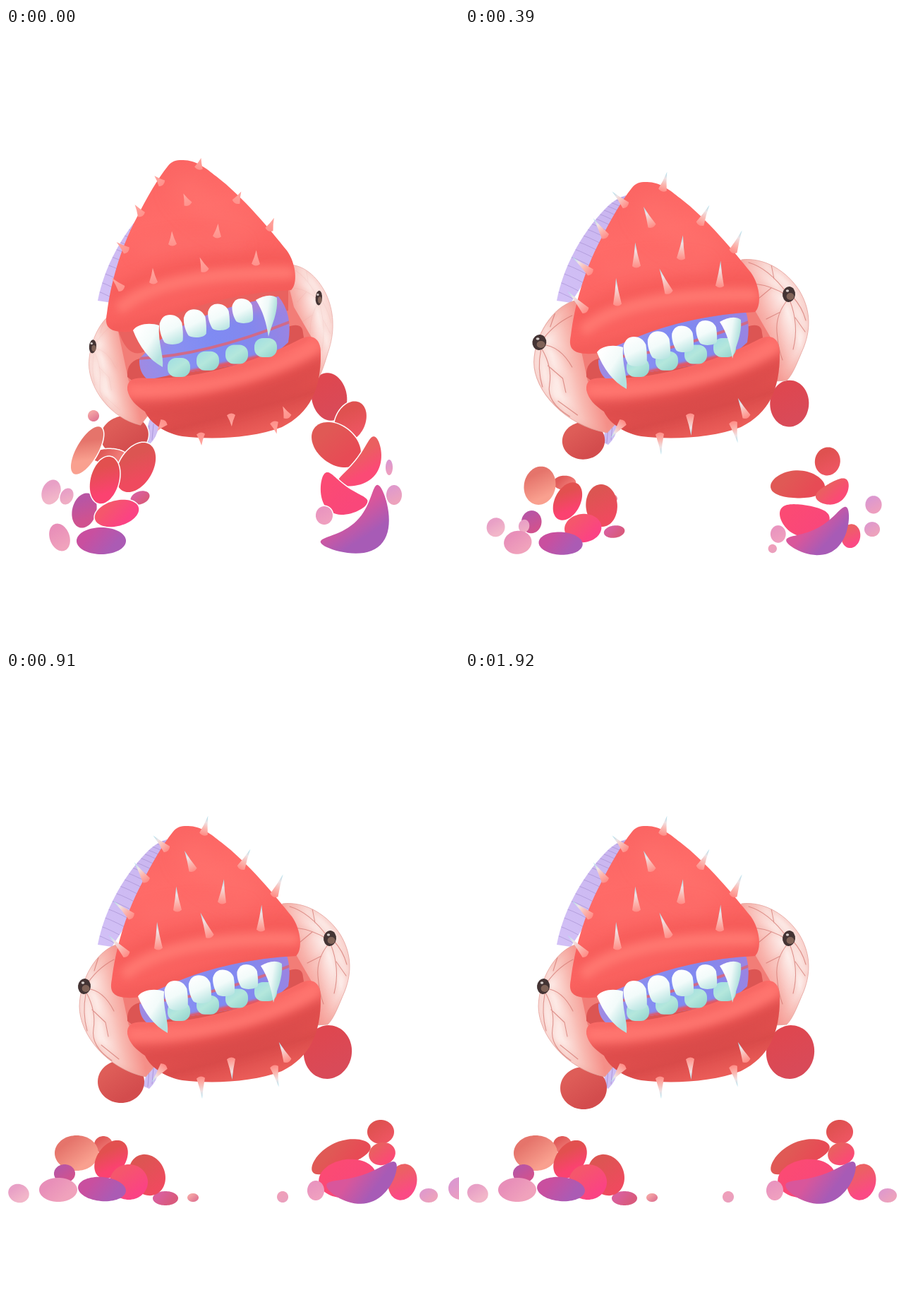
These frames come from a looping animation (642 px wide and 872 px high, 2420 ms). An HTML page with a canvas:

```html
<!DOCTYPE html>
<html lang="en">
<head>
<meta charset="utf-8">
<title>Crumbling creature</title>
<style>
  html, body { margin: 0; width: 100%; height: 100%; overflow: hidden; background: #fff; }
  canvas { display: block; }
</style>
</head>
<body>
<canvas id="stage" width="642" height="872"></canvas>
<script>
const ctx = document.getElementById('stage').getContext('2d');
const LOOP = 2420, SINK = 390, FALL = 650;
const STEPS = [0, 130, 260, 390, 520, 650, 780, 910, 1040, 1170, 1270, 1470, 1670, 1920];
const mix = (a, b, t) => a + (b - a) * t;
const progress = (t, from, length) => Math.min(1, Math.max(0, (t - from) / length));
const easeOut = p => 1 - (1 - p) ** 2;

function ramp(x0, y0, x1, y1, ...colors) {
  const g = ctx.createLinearGradient(x0, y0, x1, y1);
  colors.forEach((c, i) => g.addColorStop(i / (colors.length - 1), c));
  return g;
}

function fill(d, style) {
  ctx.fillStyle = style;
  ctx.fill(new Path2D(d));
}

function line(d, color, width, blur = 0, alpha = 1) {
  ctx.save();
  if (blur) ctx.filter = `blur(${blur}px)`;
  ctx.globalAlpha = alpha;
  ctx.strokeStyle = color;
  ctx.lineWidth = width;
  ctx.lineCap = ctx.lineJoin = 'round';
  ctx.stroke(new Path2D(d));
  ctx.restore();
}

function inside(d, paint) {
  ctx.save();
  ctx.clip(new Path2D(d));
  paint();
  ctx.restore();
}

function blob(x, y, rx, ry, color, angle = 0) {
  ctx.fillStyle = color;
  ctx.beginPath();
  ctx.ellipse(x, y, rx, ry, angle, 0, Math.PI * 2);
  ctx.fill();
}

// ---- stones: each falls from its place in the leg to its place in the pile
const stones = [];
const stone = (c1, c2, from, to, drift) => stones.push({ c1, c2, from, to, drift });
const pose = (x, y, rx, ry, deg = 0, bend = 0) => ({ x, y, rx, ry, deg, bend });

// thighs bounce up when the rubble lands
const bounce = (dx, dy) => t => t >= FALL && t < 1040 ? [dx, dy] : [0, 0];
const roll = (dx, dy, time, back = 0) => t => {
  const p = progress(t, FALL, time);
  return [dx * p + back * progress(t, FALL + time, 300), dy * p];
};

function bean(rx, ry, bend) {
  const path = new Path2D();
  for (let a = 0; a < Math.PI * 2; a += Math.PI / 36) {
    const c = Math.cos(a);
    path.lineTo(rx * c, ry * (Math.sin(a) + bend * (2 * c * c - 1)));
  }
  path.closePath();
  return path;
}

function drawStone({ c1, c2, from, to, drift }, t) {
  const p = progress(t, 0, FALL);
  const now = key => mix(from[key], to[key], p);
  const size = 1 - 0.1 * Math.sin(Math.PI * p);
  const [dx, dy] = drift ? drift(t) : [0, 0];
  const rx = now('rx') * size, ry = now('ry') * size, turn = now('deg') * Math.PI / 180;
  const path = bean(rx, ry, now('bend'));
  // keep the light falling from the upper left whatever the turn
  const gx = 0.6 * rx * Math.cos(0.9 - turn), gy = 0.8 * ry * Math.sin(0.9 - turn);
  ctx.save();
  ctx.translate(now('x') + dx, now('y') + dy);
  ctx.rotate(turn);
  if (p < 0.3) {
    ctx.strokeStyle = '#fff';
    ctx.lineWidth = 3;
    ctx.stroke(path);
  }
  ctx.fillStyle = ramp(-gx, -gy, gx, gy, c1, c2);
  ctx.fill(path);
  ctx.restore();
}

// left leg
stone('#f3a2a4', '#e27a94', pose(124, 549, 8, 8), pose(265, 744, 8, 6));
stone('#d95f9c', '#d95a7e', pose(190, 665, 14, 9, -20), pose(226, 745, 18, 10));
stone('#de5d58', '#d34c4d', pose(168, 577, 34, 28, -10), pose(168, 589, 33, 30), bounce(-5, -9));
stone('#e05a58', '#f07a76', pose(146, 606, 25, 10), pose(138, 669, 13, 12));
stone('#e5746b', '#f9a08f', pose(115, 598, 15, 38, 30), pose(100, 681, 31, 25));
stone('#dc5552', '#ef4a5e', pose(184, 622, 24, 38, 30), pose(200, 712, 25, 30, -25));
stone('#b955a3', '#d0528f', pose(111, 683, 17, 25, 15), pose(83, 710, 15, 13));
stone('#e2504f', '#fb4270', pose(140, 640, 20, 34, 15), pose(149, 690, 20, 30, 35));
stone('#f5566c', '#fb4383', pose(157, 687, 32, 18, -15), pose(174, 722, 27, 25));
stone('#c94f9f', '#ab5bb4', pose(135, 726, 35, 19), pose(136, 732, 34, 17, 5));
stone('#e8a0c6', '#f2b6c9', pose(64, 657, 13, 18, 20), pose(30, 740, 15, 13, 20), roll(-12, -2, 260));
stone('#e8a0c6', '#efadc4', pose(86, 663, 9, 12, 25), pose(82, 733, 8, 9));
stone('#e88fb9', '#f0a2bc', pose(76, 721, 14, 20, -20), pose(74, 733, 27, 17));

// right leg
stone('#ef9fba', '#eaa0bd', pose(470, 728, 5, 5), pose(413, 743, 8, 8), roll(-50, 0, 620, 10));
stone('#de4750', '#d94a58', pose(458, 522, 25, 34, -10), pose(461, 538, 34, 38, 10), bounce(-5, 0));
stone('#df5150', '#ec5560', pose(488, 557, 21, 30, 25), pose(531, 651, 19, 17));
stone('#e05955', '#e74b55', pose(468, 590, 39, 27, 38), pose(474, 686, 45, 18, -24, 0.15));
stone('#ea5f60', '#fb4a75', pose(504, 617, 42, 17, -52, -0.45), pose(533, 682, 19, 16, -15));
stone('#fb4a74', '#f9477a', pose(476, 660, 37, 21, 35, -0.4), pose(484, 717, 41, 27, -8));
stone('#ec6064', '#fb4a84', pose(524, 715, 7, 8), pose(562, 722, 20, 26, 15));
stone('#d9569b', '#a75bb6', pose(501, 702, 58, 24, -45, -0.75), pose(507, 722, 52, 20, -18, -0.5));
stone('#e995bf', '#ef9fbf', pose(451, 690, 12, 13), pose(439, 734, 12, 14));
stone('#dc98cf', '#ed9ebf', pose(543, 622, 5, 11), pose(603, 710, 18, 16), roll(100, 50, 620));
stone('#e09acb', '#eda2bc', pose(550, 661, 11, 14), pose(595, 742, 13, 10), roll(4, -1, 260));

// ---- creature
function frill() {
  const d = 'M228 237C212 242 203 251 193 262C165 293 139 338 130 386L150 389L240 250Z';
  fill(d, ramp(215, 250, 135, 380, '#c9b5ef', '#d2c0f6'));
  inside(d, () => {
    for (let i = 0; i < 17; i++) {
      const t = i / 16, x = mix(218, 128, t), y = mix(240, 374, t) - 20 * Math.sin(t * Math.PI);
      line(`M${x - 10} ${y - 5}q15 3 42 18`, '#9c86c9', 0.9, 0, 0.6);
    }
  });
  fill('M194 586Q202 560 205 550L218 560Q214 580 203 590Z', '#cdbdf3');
  line('M203 563l-2 24M209 561l-2 22', '#a994d8', 0.9);
}

function eye(ox, oy, sx, sy, d, shade, veins, strain, px, py) {
  ctx.save();
  ctx.translate(ox, oy);
  ctx.scale(sx, sy);
  ctx.translate(-ox, -oy);
  fill(d, shade);
  inside(d, () => {
    line(d, '#ef9790', 6, 3, 0.35);
    line(veins, '#cf706b', 1.1, 0, mix(0.1, 0.75, strain));
    line(veins, '#f0a8a0', 5, 3, 0.3);
  });
  line(d, '#e5a09a', 1, 0, 0.8);
  const w = mix(6.5, 9, strain);
  blob(px, py, w, 11, '#443434', 0.1);
  blob(px + 2, py + 3, w * 0.6, 5, '#806358');
  blob(px - 2, py - 5, 2.2, 1.8, '#d8cfcc');
  ctx.restore();
}

function eyes(t) {
  const open = easeOut(progress(t, 0, SINK));
  const swell = 0.11 * Math.sin(Math.PI * progress(t, 0, FALL));
  eye(165, 490, mix(0.78, 1, open) + swell, mix(0.87, 1, open),
    'M156 386C127 396 105 436 104 473C104 513 143 562 198 573L222 545L185 430Z',
    ramp(106, 480, 202, 460, '#fdeeeb', '#fdeae6', '#f8b9b1', '#f58f88', '#f38882'),
    'M112 446Q128 420 153 407M125 423l6-19M114 448Q138 450 153 480M114 454Q128 480 124 505T150 550M122 478l19 18 4 20M113 456Q108 482 115 508M135 528l25 20',
    open, 111, 445);
  eye(405, 480, mix(0.71, 1, open), mix(0.95, 1, open),
    'M392 328C425 324 457 345 474 372C489 397 491 424 480 452C471 473 465 490 456 499L440 500L395 445Z',
    ramp(402, 430, 488, 395, '#f4857f', '#f8b4ad', '#fdeeeb', '#fce2de'),
    'M456 375Q430 340 402 332M438 355l-4-20M455 378Q435 365 410 362M434 368l-18 15M458 384Q440 405 442 430T450 470M447 402l-20 10M460 385Q474 420 465 455M468 410l14 20M464 380Q478 395 483 414',
    open, 459, 377);
}

function mouth() {
  fill('M158 425L240 400L320 372L400 362L408 395L440 450L200 525L174 500Z', '#f27d77');
  fill('M158 425L300 380L400 362L400 400L196 458Q172 470 158 425Z', '#e9625f');
  fill('M172 494Q170 470 195 467L395 425Q420 414 421 432L425 455L200 515Z', '#dc5553');
  const tongue = 'M189 468Q215 440 250 422Q300 395 386 380Q407 405 400 445L372 470L230 492L201 498Q188 488 189 468Z';
  fill(tongue, ramp(188, 480, 402, 425, '#a08ae2', '#8a90f1', '#7f8bf3', '#8388ee', '#9a84e2'));
  inside(tongue, () => {
    line('M185 468Q280 465 405 415', '#cf6a8a', 4, 0.6);
    line('M200 445Q290 400 390 384', '#b883d2', 20, 6, 0.7);
    line('M235 496L390 462', '#e25764', 12, 1.5);
  });
}

function lowerJaw() {
  const d = 'M172 512C171 498 181 494 200 496C270 498 350 474 414 442C435 430 447 441 446 462C446 512 431 545 391 565C350 581 290 583 250 578C228 574 206 562 197 543C184 534 175 526 172 512Z';
  fill(d, ramp(280, 490, 305, 584, '#fc6c68', '#ea5452', '#da4b4a', '#ea5c58'));
  inside(d, () => {
    line('M180 541C270 550 375 524 452 472', '#d34746', 20, 9, 0.6);
    line('M182 513C260 518 365 494 437 452', '#ff7872', 17, 6, 0.9);
    line('M176 500C270 500 350 478 425 440', '#f2625e', 4, 3, 0.8);
  });
}

function lowerTooth(x, y) {
  ctx.fillStyle = ramp(x - 10, y - 14, x + 10, y + 14, '#a2dfe2', '#b4e7dc', '#95d5cf');
  ctx.beginPath();
  ctx.roundRect(x - 16, y - 13, 32, 27, 12);
  ctx.fill();
}

function upperJaw() {
  const d = 'M256 218C275 217 290 229 305 241C343 270 381 316 405 346C418 364 421 393 411 402C350 405 290 418 240 439C210 451 192 463 172 461C149 460 147 450 150 435C155 395 168 345 192 300C207 270 223 243 236 227C242 219 248 218 256 218Z';
  fill(d, ramp(235, 225, 300, 430, '#fb6563', '#ff6b68', '#fc6462', '#f8605d'));
  inside(d, () => {
    line('M262 255Q285 290 350 315', '#ff7571', 32, 15, 0.6);
    line('M200 345Q270 325 335 340', '#ff7773', 16, 11, 0.5);
    line('M158 408C215 370 300 356 415 355', '#f05553', 13, 8, 0.6);
    line('M172 425C215 391 300 376 408 378', '#ff7a73', 17, 6, 0.9);
    line('M155 458C230 449 285 416 414 400', '#ef5856', 12, 6, 0.6);
  });
}

function upperTooth(x, y, w, h) {
  ctx.save();
  ctx.translate(x, y);
  ctx.scale(w, h);
  fill('M.02 .3C.1 .08 .25 0 .45 0C.7 0 .85 .1 .95 .27C1 .5 1 .7 .99 .86C.9 1.02 .4 1.04 .22 .93C.08 .75 0 .5 .02 .3Z',
    ramp(0.3, 0, 0.7, 1, '#fff', '#f2fbfa', '#b9e5e2'));
  ctx.restore();
}

function upperTeeth() {
  for (let i = 3; i >= 0; i--) {
    upperTooth(224 + i * 34.3, 437 - i * 7.7, 34 - i * 1.2, 42 - i * 2.3);
  }
  fill('M187 459C194 449 212 448 224 452C222 476 231 495 229 511C210 501 196 482 187 459Z',
    ramp(190, 465, 229, 490, '#fff', '#f3fbfa', '#b5e2e0'));
  fill('M361 416C371 410 383 407 391 413C393 434 383 452 379 468C376 448 371 431 361 416Z',
    ramp(364, 425, 391, 430, '#fff', '#eef9f8', '#aadeda'));
}

// lean is in degrees from straight up
function spike(x, y, lean, length, grow) {
  const size = length * grow;
  const tips = grow < 0.7 ? ['#ff918b', '#ffa8a1'] : ['#ff8c86', '#fbb5ae', '#eee3e5', '#a5deed'];
  ctx.save();
  ctx.translate(x, y);
  ctx.rotate((lean - 90) * Math.PI / 180);
  fill(`M0 -6Q${size * 0.5} -2 ${size} 0Q${size * 0.5} 2 0 6Q-5 0 0 -6Z`, ramp(-2, 0, size, 0, ...tips));
  ctx.restore();
}

const headSpikes = [
  [280, 229, 14], [228, 251, -45], [333, 277, 27], [265, 280, -24], [380, 316, 23],
  [199, 295, -34], [243, 337, -3], [306, 326, 5], [178, 346, -50], [289, 374, -22],
  [361, 365, 2], [171, 400, -43], [216, 391, -3]];
const chinSpikes = [[224, 558, 218], [276, 575, 176], [319, 548, 177], [380, 559, 167], [399, 550, -25]];

function draw(t) {
  const sink = progress(t, 0, SINK);
  const grow = mix(0.55, 1, easeOut(sink));
  ctx.fillStyle = '#fff';
  ctx.fillRect(0, 0, 642, 872);
  frill();
  stones.forEach(s => drawStone(s, t));
  eyes(t);
  mouth();
  lowerJaw();
  for (let i = 0; i < 4; i++) lowerTooth(245 + i * 41, 480 - i * 9.3);
  chinSpikes.forEach(([x, y, lean]) => spike(x, y, lean, 29, grow));
  ctx.save();
  ctx.translate(-7 * (1 - sink), -31 * (1 - sink));
  upperJaw();
  upperTeeth();
  headSpikes.forEach(([x, y, lean]) => spike(x, y, lean, 26 + (y - 229) * 0.07, grow));
  ctx.restore();
}

let shown = -1;
const start = performance.now();
function tick(now) {
  const t = Math.max(0, now - start) % LOOP;
  const step = STEPS.filter(v => v <= t).pop();
  if (step !== shown) draw(shown = step);
  requestAnimationFrame(tick);
}
tick(start);
</script>
</body>
</html>
```
